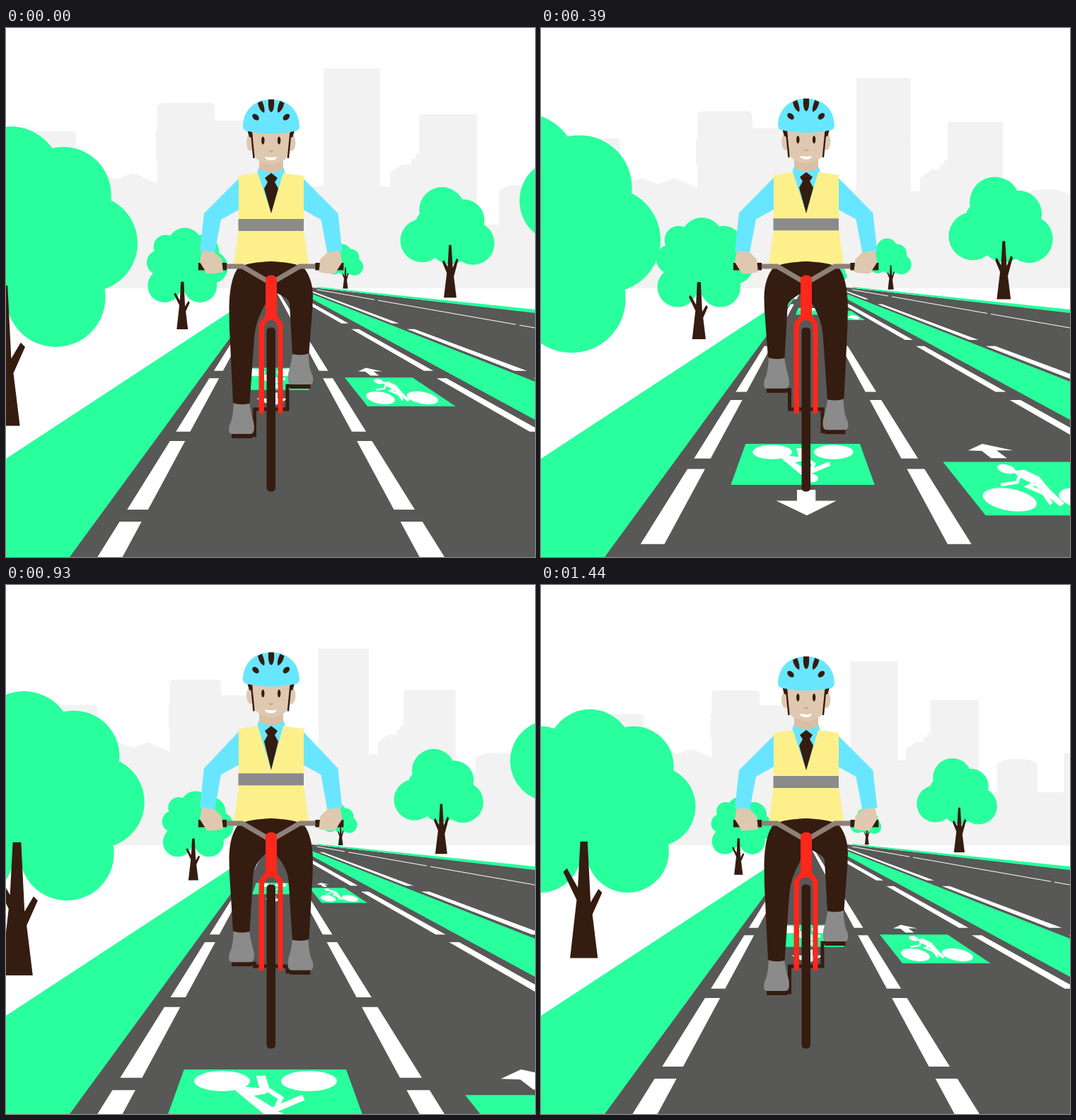
These frames come from a looping animation (748 by 748 pixels, 1.47 s). An HTML page with a canvas:

```html
<!DOCTYPE html>
<html lang="en">
<head>
<meta charset="utf-8">
<title>Cyclist</title>
<style>
html, body { margin: 0; width: 100%; height: 100%; overflow: hidden; background: #fff; }
canvas { display: block; width: 748px; height: 748px; }
</style>
</head>
<body>
<canvas id="stage" width="748" height="748"></canvas>
<script>
const ctx = document.getElementById('stage').getContext('2d');
const STEP = 30, STEPS = 49;
const GREEN = '#29ff9d', ROAD = '#585857', BROWN = '#351c10', BLUE = '#69e6ff',
      SKIN = '#dfc8b0', RED = '#fb281c', GREY = '#8b8b8b', YELLOW = '#fdf08b', WHITE = '#fff';

const fill = (color, d) => { ctx.fillStyle = color; ctx.fill(new Path2D(d)); };
const line = (color, w, d) => { ctx.strokeStyle = color; ctx.lineWidth = w; ctx.stroke(new Path2D(d)); };
const oval = (color, x, y, rx, ry = rx, deg = 0) => {
  ctx.fillStyle = color;
  ctx.beginPath();
  ctx.ellipse(x, y, rx, ry, deg * Math.PI / 180, 0, 7);
  ctx.fill();
};
const at = (x, y, k, draw) => {
  ctx.save();
  ctx.translate(x, y);
  ctx.scale(k, k);
  draw();
  ctx.restore();
};
const mirrored = draw => {
  ctx.save();
  ctx.transform(-1, 0, 0, 1, 749.4, 0);
  draw();
  ctx.restore();
};
const bothSides = draw => { draw(); mirrored(draw); };
const mix = (a, b, m) => a + (b - a) * m;

function city(f) {
  at(380, 368, 1 - 0.00343 * f, () => {
    ctx.translate(-380, -368);
    fill('#f2f2f2', `M-200,368 V170 H20 V151 Q20,146 25,146 H94 Q99,146 99,151 V214
      L132,205 L156,214 L180,205 L214,220 V185 H212 V145 H214 V113 Q214,106 221,106 H288 Q295,106 295,113
      V131 H375 V224 H449 V57 H529 V224 H543 V205 L560,193 H573 V185 H579 V178 H584 V122 H666 V278
      H697 V230 Q710,222 722,222 H740 Q752,222 765,230 V278 H810 V212 H1000 V368Z`);
  });
}

// Dashes drift away from the viewer: height of the dash boundary number u
const dashY = u => 180 + 518 * Math.pow(0.78, u);
const edge = (x, y, m) => v => x + (v - y) * m;

function dashes(a, b, phase) {
  for (let n = -1; n < 5; n++) {
    const top = Math.max(dashY(n + phase), 369), low = dashY(n - 0.865 + phase);
    if (low > top) fill(WHITE, `M${a(top)},${top} H${b(top)} L${b(low)},${low} H${a(low)}Z`);
  }
}

function road(f) {
  fill(GREEN, 'M0,609 L369,367 V400 L90,748 H0Z');
  fill(ROAD, 'M90,748 L369,367 H434 L748,402 V748Z');
  fill(GREEN, 'M440,366 L748,398 V403 L440,367.5Z');
  fill(GREEN, 'M425,373 L748,500 V554 L425,379Z');
  const step = f % 8, phase = step / 8;
  bothSides(() => dashes(edge(584.7, 748, 0.54), edge(620, 748, 0.625), phase));
  dashes(edge(748, 575, 1.74), edge(748, 565, 1.79), phase);
  dashes(edge(748, 496, 2.58), edge(748, 489, 2.695), phase);
  line(WHITE, 1, 'M440,370 L748,424');
  for (const x of [523 - 6 * step, 723 - 18 * step]) {
    ctx.fillStyle = ROAD;
    ctx.fillRect(x - 2, 369 + (x - 434) * 0.175 - 2, 5, 4);
  }
}

// Distance law shared by lane signs and the trees on the left
const depth = s => 392.5 - 16.6 * s + 0.183 * s * s;

function nearSign() {
  fill(GREEN, 'M-116,300 H93 L120,375 H-143Z');
  oval(WHITE, -67, 315, 36, 13);
  oval(WHITE, 45, 315, 36, 13);
  oval(WHITE, 2, 362, 15, 8, 8);
  fill(WHITE, 'M-50,327 L-37,322 L-19,324 L-23,308 L-11,308 L-6,324 L-10,331 L-26,334 L-6,346 L10,358 L-10,360Z');
  line(WHITE, 8, 'M-5,354 L38,336');
  line(WHITE, 6, 'M-14,324 L-6,327 L9,337 L4,347');
  fill(WHITE, 'M-22,384 H12 V404 H50 L-4,431 L-60,404 H-22Z');
}

function farSign() {
  fill(WHITE, 'M296,312 L322,300 L378,312 H348 L367,326 H338 L321,313Z');
  fill(GREEN, 'M250,333 H481 L628,431 H328Z');
  oval(WHITE, 372, 402, 50, 20, 10);
  oval(WHITE, 515, 402, 54, 20, 11);
  oval(WHITE, 366, 346, 17, 8, 15);
  fill(WHITE, 'M376,350 L398,347 L426,360 L446,384 L472,409 L464,414 L438,394 L416,374 L392,362Z');
  line(WHITE, 6, 'M390,357 L386,370 L356,375');
  line(WHITE, 7, 'M424,370 L406,378 L434,390 L448,410');
}

function signs(f) {
  for (const s of [f - 2, f < 24 ? f + 21 : f - 27]) {
    if (s < -5 || s > 45) continue;
    const k = depth(s) / 300;
    at(379, 356, k, nearSign);
    at(375, 356, k, farSign);
  }
}

function crown(lobes) {
  for (const [x, y, r] of lobes) oval(GREEN, x, y, r);
}
const LEFT_CROWN = [[5, -170, 35], [-34, -167, 24], [41, -158, 33], [-47, -135, 25],
  [59, -125, 33], [36, -88, 34], [-36, -88, 34], [0, -125, 46]];
const RIGHT_CROWN = [[-4.6, -50, 13], [7.6, -44, 12], [-16, -32.5, 12.4], [13, -31, 12.3],
  [0, -30.5, 11.5], [-10, -41, 10]];

function trees(f) {
  for (const start of [28.2, 13.1, -1.4, -17, -31.8]) {
    const s = f + start, d = depth(s);
    if (s < -6 || s > 42) continue;
    at(379 - 1.855 * d, 356 + d, d / 100, () => {
      crown(LEFT_CROWN);
      fill(BROWN, `M-11.4,0 L-6,-48 L-17,-71 L-14,-74 L-5,-58 L-3,-96 H3
        L5.5,-46 L12,-57 L15,-54 L7,-36 L11.4,0Z`);
    });
  }
  for (const start of [22, 7, -8, -23, -38]) {
    const s = f + start, d = 347 - 15.5 * s + 0.194 * s * s;
    if (s < -12 || s > 38) continue;
    at(380 + d, 360 + 0.0855 * d, d / 100, () => {
      crown(RIGHT_CROWN);
      fill(BROWN, `M-3.6,0 L-1.9,-14 L-4.4,-20 L-3.6,-21.5 L-1.4,-17.5 L-.7,-30 H.7
        L1.5,-17 L3.7,-22.5 L4.6,-21.5 L2.1,-12 L3.6,0Z`);
    });
  }
}

// c runs from 1 (pedal down) to -1 (pedal up)
function leg(c) {
  const m = (c + 1) / 2, y = 35 * c, ankle = 496 + y;
  line(BROWN, 5, `M375,539 H351.5 V${541 + y} H340`);
  ctx.fillStyle = BROWN;
  ctx.fillRect(319, 538 + y, 29, 7);
  fill(GREY, `M322,${ankle - 2} H344 Q346,${ankle + 14} 350,${ankle + 26} Q353,${ankle + 42} 346,${ankle + 43}
    H319 Q313,${ankle + 42} 316,${ankle + 30} Q321,${ankle + 22} 322,${ankle - 2}Z`);
  fill(BROWN, `M376,330 Q345,331 329,338 Q316,354 315.5,${mix(378, 396, m)} L316,${mix(396, 425, m)}
    L321,${ankle - 1} Q330,${ankle + 3} 344.5,${ankle} L${mix(348.5, 351, m)},${mix(388, 438, m)}
    Q${mix(350, 353, m)},${mix(383, 412, m)} ${mix(364, 368, m)},${mix(376, 388, m)} L376,${mix(372, 376, m)}Z`);
}

function bike() {
  bothSides(() => {
    line('#8e8178', 7, 'M308,337 H334 L370,358');
    ctx.fillStyle = BROWN;
    ctx.fillRect(272, 332, 40, 10.5);
    fill(SKIN, 'M277,315 L295,317 L305,327 L307,345 Q295,348 284,347 L274,331Z');
  });
  fill(RED, `M367,357 Q367,349.500 375,349.500 Q383,349.500 383,357 V406 L391.500,418 V543 Q388,548 384.500,543
    V424 Q383,413 375,413 Q366,413 365,424 V543 Q361,548 357.500,543 V418 L367,406Z`);
  ctx.fillStyle = BROWN;
  ctx.beginPath();
  ctx.roundRect(368.5, 423.5, 12.5, 232, 5);
  ctx.fill();
}

function torso(dy) {
  const top = 209 + dy, elbow = 262 + dy * 0.5;
  bothSides(() => fill(BLUE, `M331,${top + 2} L280,${elbow} L274,315 Q284,320 295,318 L304,${elbow + 9} L331,${256 + dy * 0.5}Z`));
  fill(BLUE, `M357,${198 + dy} H393 L396,${212 + dy} L375,264 L354,${212 + dy}Z`);
  fill(YELLOW, `M329,${top} L356,${top - 4} L375,262 L392,${top - 4} L421,${top}
    V285 L428,334 Q375,338 322,334 L329,285Z`);
  ctx.fillStyle = GREY;
  ctx.fillRect(328.5, 270 + dy * 0.65, 92.5, 17);
  fill(BROWN, `M366,${212 + dy} L375,${205 + dy} L384,${212 + dy} L380,${218 + dy} L385,${227 + dy}
    L375,${262 + dy * 0.1} L365,${227 + dy} L370,${218 + dy}Z`);
}

function head() {
  fill('#d8bfa6', 'M358,182 H392 V199 Q375,209 358,199Z');
  bothSides(() => {
    oval(SKIN, 346, 162, 6, 12);
    fill(BROWN, 'M341,144 H352 L349,156 L344,154Z');
  });
  fill(SKIN, 'M348,145 H402 L400,178 Q396,190 375,193 Q354,190 350,178Z');
  bothSides(() => {
    line(BROWN, 2.4, 'M347,148 L350.500,184');
    oval(BROWN, 363.3, 159, 2.2, 5.5);
  });
  fill('#c5a48b', 'M371,173 H379 L375,176Z');
  fill(WHITE, 'M366,182 Q375,184 383,182 Q382,187 375,187 Q367,187 366,182Z');
  fill(BLUE, 'M335,139 C336,113 354,101 375,101 C396,101 414,113 415,139 Q415,145 408,146 Q375,153 342,146 Q335,145 335,139Z');
  fill(BROWN, 'M371,101 H379 Q380,117 375,119 Q370,117 371,101Z');
  bothSides(() => {
    fill(BROWN, 'M356,106 L362,103 Q367,115 365,120 Q358,117 356,106Z');
    oval(BROWN, 353, 126, 5.5, 3.7, 42);
  });
}

function rider(f) {
  const p = f % 24, c = 1 - Math.min(p, 24 - p) / 6;
  const dy = -6.8 * (1 - Math.abs(c));
  torso(dy);
  leg(c);
  mirrored(() => leg(-c));
  at(0, dy, 1, head);
  bike();
}

function draw(now) {
  const f = Math.floor(now / STEP) % STEPS;
  ctx.fillStyle = WHITE;
  ctx.fillRect(0, 0, 748, 748);
  city(f);
  road(f);
  signs(f);
  trees(f);
  rider(f);
}

let start;
function tick(now) {
  start ??= now;
  draw(Math.max(0, now - start));
  requestAnimationFrame(tick);
}
draw(0);
requestAnimationFrame(tick);
</script>
</body>
</html>
```
